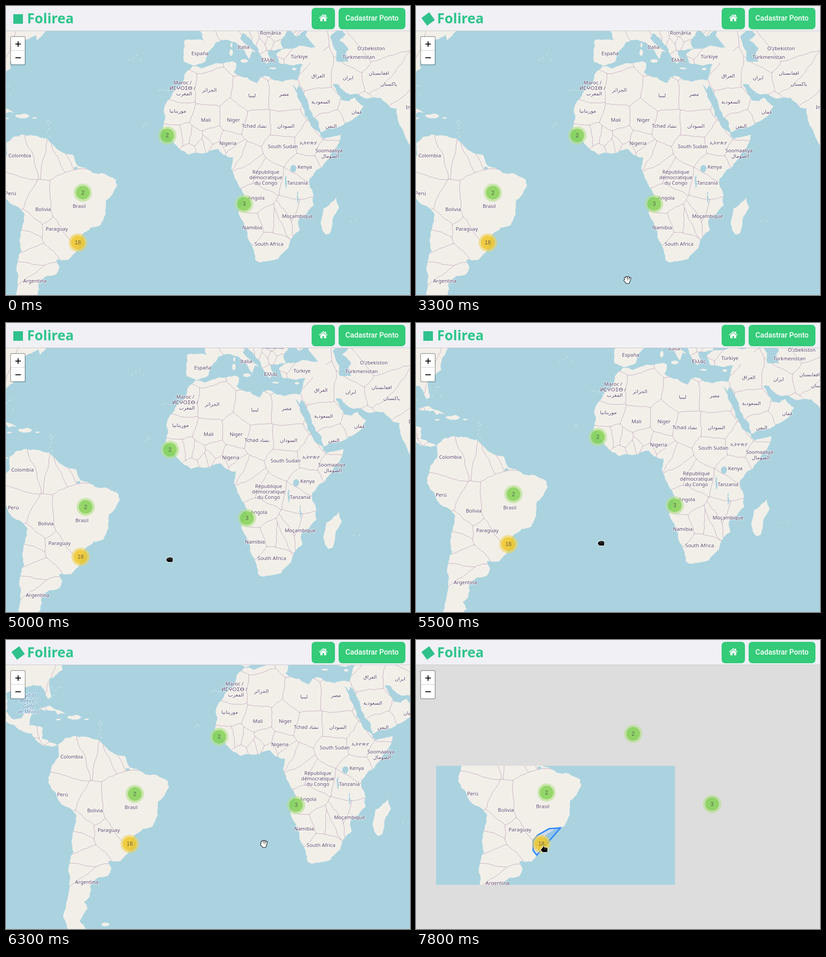
These frames come from a looping animation (883 by 634 pixels, 8 s). An HTML page with a canvas:

```html
<!DOCTYPE html>
<html lang="pt">
<head>
<meta charset="utf-8">
<style>
html, body { margin: 0; width: 100%; height: 100%; overflow: hidden; }
body { position: relative; background: #ddd; }
canvas { position: absolute; left: 0; top: 0; }
header { position: absolute; left: 0; top: 0; width: 883px; height: 54px; background: #f0f0f5; border-bottom: 1px solid #c8c8cc; }
#logo { position: absolute; left: 15.5px; top: 17.5px; width: 21px; height: 21px; background: #2fc18c; }
h1 { position: absolute; left: 46px; top: 7px; margin: 0; font: bold 30px/40px "Noto Sans", sans-serif; color: #2dc58a; }
.btn { position: absolute; top: 4px; height: 46.5px; border-radius: 8px; background: #34cb79; color: #fff; font: 500 16px/46px Roboto, sans-serif; text-align: center; }
#home { left: 667.5px; width: 51.5px; }
#add { left: 727px; width: 146px; }
#home svg { position: absolute; left: 16px; top: 13px; }
#zoom { position: absolute; left: 9px; top: 66px; width: 30px; height: 60px; border: 2px solid rgba(0,0,0,.25); border-radius: 4px; background: #fff; background-clip: padding-box; }
#zoom svg { display: block; }
</style>
</head>
<body>
<canvas id="stage" width="883" height="634"></canvas>
<header>
  <div id="logo"></div>
  <h1>Folirea</h1>
  <div class="btn" id="home"><svg width="19" height="18"><path d="M0 9 9.5 1l3.5 3V2h2.5v4.2L19 9l-1 1.2L9.5 3.200 1 10.200ZM3 10l6.5-5.300L16 10v6.500h-4.800v-5H7.800v5H3Z" fill="#fff"/></svg></div>
  <div class="btn" id="add">Cadastrar Ponto</div>
</header>
<div id="zoom"><svg width="30" height="60"><path d="M0 29.5H30" stroke="#ccc"/><path d="M9.5 15.5h12M15.5 9.5v12M9.5 45.5h12" stroke="#000" stroke-width="2"/></svg></div>
<script>
const ctx = document.getElementById('stage').getContext('2d');
const logo = document.getElementById('logo');
const WATER = '#aad3df', LAND = '#f2efe9';

// Web Mercator at zoom 3, degrees to map pixels
const project = (lon, lat) => [441 + lon * 5.689, 351 - 325.95 * Math.asinh(Math.tan(lat * Math.PI / 180))];

let seed = 11;
const rand = () => (seed = seed * 16807 % 2147483647) / 2147483647 - .5;

// Midpoint displacement gives coasts and borders their grain
function wander(path, a, b, rough) {
  const dx = b[0] - a[0], dy = b[1] - a[1];
  if (Math.hypot(dx, dy) < 4) return path.lineTo(b[0], b[1]);
  const k = rand() * rough, mid = [(a[0] + b[0]) / 2 - dy * k, (a[1] + b[1]) / 2 + dx * k];
  wander(path, a, mid, rough);
  wander(path, mid, b, rough);
}
function trace(degrees, rough) {
  const path = new Path2D(), pts = [];
  for (let i = 0; i < degrees.length; i += 2) pts.push(project(degrees[i], degrees[i + 1]));
  path.moveTo(...pts[0]);
  pts.forEach((p, i) => wander(path, p, pts[(i + 1) % pts.length], rough));
  return path;
}
function blob(lon, lat, w, h) {
  const ring = [];
  for (let a = 0; a < 6.2; a += Math.PI / 4) ring.push(lon + w * Math.cos(a), lat + h * Math.sin(a));
  return trace(ring, .3);
}

const lands = [], lakes = [];
const land = (...d) => lands.push(trace(d, .2));
const island = (...size) => lands.push(blob(...size));

// Africa
land(-6,35.8, -2,35.2, 3,36.8, 10,37.3, 11,36.8, 10,34, 11,33.2, 15.2,32.3, 19,30.4, 20.1,32.3, 22,32.9, 25,31.6, 29,30.9, 31,31.5, 34.2,31.3,
  34.8,29.5, 34.3,27.8, 32.6,29.8, 35.5,24, 37.2,21, 37.2,19, 39.5,15.5, 43.2,12.5, 43.3,11.5, 44.5,10.4, 51.2,11.9, 49.8,7.9, 46,2.4, 41.6,-1.7,
  39,-5, 40.5,-10.5, 40.7,-15, 35,-19.9, 35.4,-24, 32.8,-26, 31,-30, 27,-33.7, 20,-34.8, 18.3,-34, 17,-29.5, 14.5,-23, 11.8,-17.5, 13.8,-10.7,
  9,-1, 9.7,3.5, 6,4.3, 4.2,6.4, -2,4.8, -7.5,4.4, -13,8.7, -17.3,14.5, -16.3,19, -17,21, -13,27.8, -9.8,30, -9,33);
land(49.3,-12, 50.4,-15.7, 47,-25, 45.3,-25.6, 43.4,-22, 44.4,-16.2);
// Arabia to India
land(34.2,31.3, 35,29.5, 39.1,21.3, 42.7,16.5, 43.4,12.8, 52,15.6, 57.7,19, 59.8,22.5, 56.4,25.5, 54,24.2, 51.5,24.5, 50.2,26.5, 48,30, 50.2,30,
  54.5,26.6, 57,26.8, 61.5,25.1, 66.5,25.4, 70,22, 72.6,21.5, 73.5,16, 77.5,8, 90,22, 90,50, 42,50, 42,41, 36,36, 35,32.5);
// Anatolia and Europe
land(36.2,36.5, 32.5,36.1, 27.4,36.9, 26.3,39.5, 29,41, 35,42, 41.5,41.6, 37.5,45, 39,47, 34,44.5, 31,46.6, 28,43, 29,41.2, 23,40.5, 24,38,
  22.7,36.5, 19.4,41, 13.5,45.6, 12.4,44.2, 16,41.6, 18.5,40.1, 17,40.4, 16,38, 10.5,43, 7.5,43.7, 3.1,43, 0,40, -.7,37.6, -5.6,36, -9,37.2,
  -9,43.5, -1.6,43.4, -4,50, 44,50, 44,38);
// South America
land(-77.4,8.6, -75,11, -71.6,12, -62,10.7, -57.2,6, -51.7,4.2, -50,0, -44.3,-2.6, -40,-2.9, -35.4,-5.2, -34.8,-7.5, -39,-13, -39.2,-18, -41,-22,
  -48.3,-25.5, -48.8,-28.5, -53.5,-34, -58.2,-34, -57,-36.5, -58,-38.3, -62,-39, -65,-41, -65.3,-44.5, -67.5,-46, -66,-47.8, -69,-51, -65.2,-54.7,
  -72,-54.5, -75.5,-50, -73,-42, -73.5,-37, -71.5,-31, -70.3,-18.5, -76.2,-14, -81.2,-6, -80,.5, -77.2,4);
// North and Central America
land(-60,46.8, -65.5,43.5, -66,45, -70.5,43.5, -74,40.5, -76,36.8, -75.6,35.2, -81,32, -80.1,26, -81.5,25.5, -82.8,28.5, -84,30, -90,29.5,
  -97.3,27.5, -97.5,21, -94.5,18.2, -91.5,18.6, -90.5,21, -87,21.5, -88.5,16, -83.3,15, -83.6,11, -79.9,9.4, -77.4,8.6, -82.9,8.2, -87.6,13,
  -94.5,16.2, -105,19.5, -105,50, -64,50);
land(-84.9,21.9, -81,23.1, -74.2,20.2, -77.6,19.9, -78.5,21.3);
island(14, 37.5, 1.5, .6);
island(9, 40, .7, 1);
island(9.1, 42.2, .4, .7);
island(25, 35.2, 1.4, .3);
island(33.2, 35, .9, .4);
island(-71.3, 18.9, 2.8, .8);
island(-77.3, 18.1, 1, .3);
island(-66.5, 18.2, .9, .3);
island(-59.3, -51.7, 1.6, .5);

lakes.push(trace([50,46.8, 53,45.2, 50.5,43.5, 54,41.2, 53,40, 54,37.3, 49.5,37.4, 49.5,40.3, 47,44.5], .2));
lakes.push(blob(32.9, -1, 1.2, 1.4), blob(30, -6, .3, 2.7), blob(34.5, -12, .3, 2.4), blob(-50.7, -.8, .8, .5));

const coast = new Path2D();
lands.forEach(p => coast.addPath(p));

// Centre of each name; a fourth value widens the country's territory
const labels = [
  ['España',424,104], ['Italia',519,90], ['România',578,59], ['Ελλάς',573,118], ['Türkiye',641,111], ["O'zbekiston",798,93], ['Türkmenistan',771,112],
  ['العراق',681,153], ['ایران',745,157], ['افغانستان',813,147], ['پاکستان',838,171], ['السعودية',689,210], ['عمان',764,232], ['اليمن',708,263],
  ['مصر',608,193], ['ليبيا',540,196], ['الجزائر',444,184], ['Maroc /\nⵍⵎⵖⵔⵉⴱ /\nالمغرب',386,180], ['موريتانيا',376,230], ['Mali',437,250],
  ['Niger',497,250], ['Tchad تشاد',546,263], ['السودان',609,263], ['Nigeria',485,301], ['South Sudan',605,308], ['ኢትዮጵያ',661,300],
  ['Soomaaliya\nالصومال',706,323], ['Kenya',653,353], ['Tanzania',637,388], ['République\ndémocratique\ndu Congo',568,376], ['Angola',547,421],
  ['Namibia',538,486], ['Moçambique',637,461], ['South Africa',575,522], ['India',887,222], ['Colombia',30,328], ['Perú',10,411],
  ['Brasil',160,439,55], ['Bolivia',81,446], ['Paraguay',111,489], ['Argentina',63,603]
];

// Unnamed small countries fill the gaps
const sites = labels.map(([, x, y, reach = 0]) => ({ x, y, reach }));
function scatter(count, x, y, w, h) {
  for (let i = 0; i < count; i++)
    sites.push({ x: x + w * (i + .5) / count, y: y + h * (rand() + .5), reach: 0 });
}
scatter(8, 372, 282, 95, 35);
scatter(3, 495, 320, 45, 45);
scatter(4, 570, 430, 60, 60);
scatter(8, 520, 62, 80, 40);
scatter(4, 65, 300, 85, 25);
scatter(4, 40, 480, 12, 180);
scatter(5, -100, 200, 100, 80);

// Borders are the edges of a power diagram over all sites
const distance = (p, s) => (p[0] - s.x) ** 2 + (p[1] - s.y) ** 2 - s.reach ** 2;
function territory(site) {
  let ring = [[-500, -500], [1400, -500], [1400, 1200], [-500, 1200]];
  sites.forEach((other, id) => {
    if (other === site) return;
    const side = p => distance(p, site) - distance(p, other), next = [];
    ring.forEach((a, i) => {
      const b = ring[(i + 1) % ring.length], sa = side(a), sb = side(b), u = sa / (sa - sb);
      if (sa < 0) next.push(a);
      if (sa < 0 !== sb < 0)
        next.push([a[0] + (b[0] - a[0]) * u, a[1] + (b[1] - a[1]) * u, sa < 0 ? id : a[2]]);
    });
    ring = next;
  });
  return ring;
}
const borders = new Path2D();
sites.forEach((site, id) => {
  const ring = territory(site);
  ring.forEach((a, i) => {
    if (!(a[2] > id)) return;
    borders.moveTo(a[0], a[1]);
    wander(borders, a, ring[(i + 1) % ring.length], .14);
  });
});

// Archipelagos of tiny islands
const islets = [];
function archipelago(count, x, y, w, h) {
  for (let i = 0; i < count; i++)
    islets.push([x + w * ((i + .5) / count - .5), y + h * rand()]);
}
archipelago(4, 282, 114, 34, 12);
archipelago(5, 345, 184, 24, 6);
archipelago(4, 304, 259, 12, 14);
archipelago(8, 93, 268, 8, 38);
archipelago(6, -2, 185, 28, 30);
archipelago(2, 760, 472, 24, 6);

function write([text, x, y]) {
  const lines = text.split('\n');
  lines.forEach((line, i) => {
    const base = y + 4 + (i - (lines.length - 1) / 2) * 12;
    ctx.strokeText(line, x, base);
    ctx.fillText(line, x, base);
  });
}
function dot(x, y, r, color) {
  ctx.fillStyle = color;
  ctx.beginPath();
  ctx.arc(x, y, r, 0, 7);
  ctx.fill();
}
function drawMap() {
  ctx.fillStyle = WATER;
  ctx.fillRect(-300, -100, 1400, 1000);
  ctx.fillStyle = LAND;
  lands.forEach(p => ctx.fill(p));
  islets.forEach(([x, y]) => dot(x, y, 1, LAND));

  ctx.save();
  ctx.clip(coast);
  ctx.lineWidth = .9;
  ctx.strokeStyle = 'rgba(165,125,165,.65)';
  ctx.stroke(borders);
  ctx.restore();
  ctx.fillStyle = WATER;
  lakes.forEach(p => ctx.fill(p));

  ctx.lineWidth = 2.5;
  ctx.strokeStyle = 'rgba(255,255,255,.6)';
  ctx.font = '11px "Noto Sans", "DejaVu Sans", sans-serif';
  ctx.fillStyle = '#5c4468';
  labels.forEach(write);
  ctx.font = 'italic 10.5px "Noto Sans", sans-serif';
  ctx.fillStyle = '#4d80b3';
  write(['Gulf of\nMexico /\nGolfo\nde México', -64, 211]);
}

// Outline of the area covered by the large cluster
const hull = new Path2D('M139.4 512 149.2 500.4 173.7 486.6 198.2 484.7 147.2 543.5 139.4 533.7Z');
function drawHull() {
  ctx.fillStyle = 'rgba(51,136,255,.2)';
  ctx.strokeStyle = '#3388ff';
  ctx.lineWidth = 3;
  ctx.fill(hull);
  ctx.stroke(hull);
}

const clusters = [[2, 352.5, 284], [2, 168, 409.5], [18, 157, 519], [3, 520.5, 434]];
function drawCluster(count, x, y) {
  const big = count > 9;
  dot(x, y, 20, big ? 'rgba(241,211,87,.6)' : 'rgba(181,226,140,.6)');
  dot(x, y, 15, big ? 'rgba(240,194,12,.6)' : 'rgba(110,204,57,.6)');
  ctx.fillStyle = 'rgba(40,40,60,.65)';
  ctx.font = '12px "Liberation Sans", Arial, sans-serif';
  ctx.fillText(count, x, y + 4);
}

const fist = 'M-6-1V2M-4-3V3M-1-4V3M2-4V3M5-3V3M-4 4H5M-4 2H5';
const cursors = {
  open: ['M-5-4-3 2M-2-6-1 2M2-6V2M6-4 4 3M-6 1-2 5M-2 3H4M-2 5H3M-2 6H3', '#000', '#fff'],
  fist: [fist, '#fff', '#000'],
  point: [fist + 'M-2-6V3', '#fff', '#000']
};
function drawCursor(kind, [x, y]) {
  const [shape, edge, fill] = cursors[kind], path = new Path2D(shape);
  ctx.save();
  ctx.translate(x, y);
  for (const [color, width] of [[edge, 4.6], [fill, 2.6]]) {
    ctx.strokeStyle = color;
    ctx.lineWidth = width;
    ctx.stroke(path);
  }
  ctx.restore();
}

// Keys are [time, x, y]
const panKeys = [[4700, 0, 0], [5000, 6, -6], [5500, 45, -34], [6000, 103, -71], [6400, 117, -72]];
const cursorKeys = [[3300, 462, 601], [4100, 367, 526], [4700, 352, 525], [5000, 358, 519], [5500, 405, 483],
  [6000, 455, 454], [6400, 600, 445], [6600, 600, 445], [7300, 288, 463], [7500, 281, 460]];
function at(keys, t) {
  const i = keys.findIndex(k => k[0] > t);
  if (i === 0) return keys[0].slice(1);
  if (i < 0) return keys[keys.length - 1].slice(1);
  const a = keys[i - 1], b = keys[i], u = (t - a[0]) / (b[0] - a[0]);
  return [a[1] + (b[1] - a[1]) * u, a[2] + (b[2] - a[2]) * u];
}

// The picture advances in 100 ms steps, with a few longer holds
const holds = [[2400, 3300], [4700, 4900], [5100, 5300], [5700, 5900], [6400, 6600], [7800, 8000]];
function stepTime(ms) {
  const t = Math.floor(ms % 8000 / 100) * 100, hold = holds.find(h => t >= h[0] && t < h[1]);
  return hold ? hold[0] : t;
}

function draw(t) {
  const [px, py] = at(panKeys, t), zooming = t >= 7800, [fx, fy] = [274, 447];
  ctx.lineJoin = ctx.lineCap = 'round';
  ctx.textAlign = 'center';
  ctx.fillStyle = '#ddd';
  ctx.fillRect(0, 0, 883, 634);
  ctx.save();
  if (zooming) {
    ctx.beginPath();
    ctx.rect(44, 276, 522, 261);
    ctx.clip();
    ctx.translate(fx, fy);
    ctx.scale(1.02, 1.02);
    ctx.translate(-fx, -fy);
  }
  ctx.translate(px, py);
  drawMap();
  if (t >= 7400) drawHull();
  ctx.restore();

  const spread = zooming ? 1.0265 : 1;
  for (const [count, x, y] of clusters)
    drawCluster(count, fx + (x + px - fx) * spread, fy + (y + py - fy) * spread);

  if (t >= 3300) {
    const kind = t >= 7200 ? 'point' : t >= 4700 && t < 6300 ? 'fist' : 'open';
    drawCursor(kind, at(cursorKeys, t));
  }
  logo.style.transform = `rotate(${t / 2000 * 360}deg)`;
}

let shown = -1;
function frame() {
  const t = stepTime(performance.now());
  if (t !== shown) draw(shown = t);
  requestAnimationFrame(frame);
}
frame();
</script>
</body>
</html>
```
